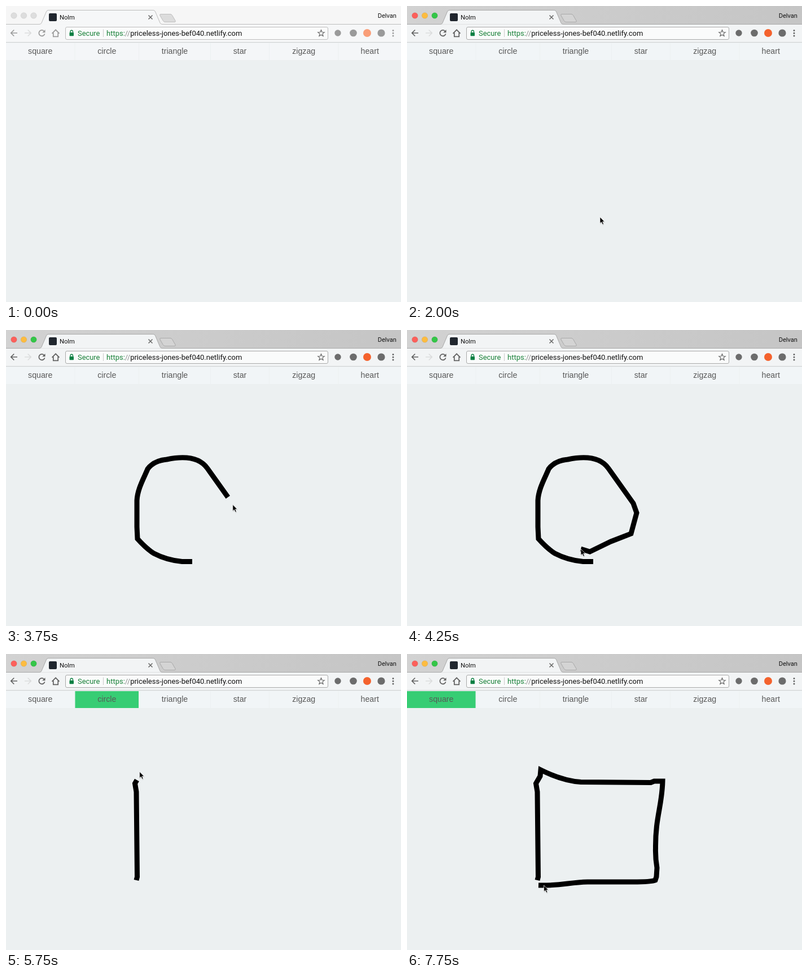
An HTML page for the animation above (8 s loop, 700x526 px).

```html
<!DOCTYPE html>
<html lang="en">
<head>
<meta charset="utf-8">
<title>Shape sketch</title>
<style>
  html, body { margin: 0; width: 100%; height: 100%; overflow: hidden; background: #ecf0f1; }
  svg { display: block; width: 700px; height: 526px; }
  text { font-family: Roboto, "Open Sans", sans-serif; fill: #111; }
  #nav text { font: 14.2px "Liberation Sans", Arial, sans-serif; fill: #585858; text-anchor: middle; }
  .icon { fill: none; stroke: var(--icon); stroke-width: 1.7; }
  .ext { fill: var(--ext); }
  .edge { stroke: var(--edge); }
  .secure { fill: #188038; }
  #ink { fill: none; stroke: #000; stroke-width: 9; }
  #stage { --bar: #f6f6f6; --tool: #f6f7f8; --cell: #f4f6f8; --edge: #bdbdbd; --icon: #9b9b9b; --ext: #9a9a9a;
    --hot: #f99e78; --plus: #dcdcdc; }
  #stage.active { --bar: url(#metal); --tool: #f2f4f5; --cell: #f1f5f7; --edge: #a9a9a9; --icon: #606060; --ext: #6c6c6c;
    --hot: #f4622d; --plus: #d4d4d4; }
  #lights circle { stroke: #0001; }
  #stage:not(.active) #lights circle { fill: #ddd; }
</style>
</head>
<body>
<svg id="stage" viewBox="0 0 700 526">
  <defs>
    <linearGradient id="metal">
      <stop offset="0" stop-color="#d2d2d2"/>
      <stop offset="1" stop-color="#c5c5c5"/>
    </linearGradient>
  </defs>

  <rect width="700" height="33" style="fill:var(--bar)"/>
  <rect y="33" width="700" height="32" style="fill:var(--tool)"/>
  <g id="lights">
    <circle cx="14" cy="17" r="5.3" fill="#fc605b"/>
    <circle cx="31.5" cy="17" r="5.3" fill="#fdbc40"/>
    <circle cx="49" cy="17" r="5.3" fill="#34c648"/>
  </g>
  <path class="edge" d="M0 32.5H59Q62 32.5 63 30L71.5 10Q72.5 7.5 75 7.5H261Q263.5 7.5 264.5 10L273 30Q274 32.5 277 32.5H700" style="fill:var(--tool)"/>
  <path class="edge" d="M274 14.5H291Q293.5 14.5 294.5 16.5L300 26Q301 28.5 299 28.5H282Q279.5 28.5 278.5 26.5L273 17Q272 14.5 274 14.5Z" style="fill:var(--plus)"/>
  <rect x="76" y="13" width="14" height="14" rx="2" fill="#20262e"/>
  <text x="95" y="24" font-size="11.2">Nolm</text>
  <path d="M252.5 16.5l7 7m0-7l-7 7" stroke="#666" stroke-width="1.5"/>
  <text x="692" y="21" font-size="11.1" text-anchor="end">Delvan</text>

  <g class="icon">
    <path d="M20 48H9m5.300-5.500L8.800 48l5.500 5.500"/>
    <path d="M33 48H44m-5.300-5.500l5.500 5.500l-5.500 5.500" style="stroke:#dcdddd"/>
    <path d="M67.300 44.500A5.200 5.200 0 1 0 68.600 49.500"/>
    <path d="M69.500 42V47.300H64.200Z" style="fill:var(--icon);stroke:none"/>
    <path d="M81.500 48.800L88 42.300L94.500 48.800M83.800 47.500V54.300H92.200V47.500"/>
  </g>
  <rect class="edge" x="105.500" y="37.500" width="465" height="22" rx="2.500" fill="#fafbfb"/>
  <rect x="112.500" y="47" width="7.500" height="6.200" rx=".8" fill="#0b8043"/>
  <path d="M114 47.500V45.500a2.250 2.250 0 0 1 4.500 0v2" fill="none" stroke="#0b8043" stroke-width="1.300"/>
  <text class="secure" x="127" y="52.500" font-size="12.9">Secure</text>
  <path d="M172.500 41.500V55" stroke="#c9c9c9"/>
  <text x="178" y="52.500" font-size="13"><tspan class="secure">https:</tspan><tspan fill="#8a8a8a">//</tspan>priceless-jones-bef040.netlify.com</text>
  <path id="star" fill="none" stroke="#666" stroke-width="1.200"/>
  <g class="ext">
    <circle cx="588" cy="48" r="5.700"/>
    <circle cx="615.500" cy="48" r="6.300"/>
    <circle cx="640" cy="48" r="7" style="fill:var(--hot)"/>
    <circle cx="665" cy="48" r="6.600"/>
  </g>
  <path d="M686 43.500v10" fill="none" stroke-width="3" stroke-linecap="round" stroke-dasharray="0 4.800" style="stroke:var(--icon)"/>
  <path d="M0 64.500H700" stroke="#cfd1d2"/>
  <g id="nav"></g>

  <path id="ink"/>
  <g id="cursor">
    <path d="M.5 2V13L3.200 10.500L5 14.800L7.200 13.800L5.300 9.700H9Z" opacity=".15"/>
    <path d="M0 0V11.300L2.600 8.900L4.500 13.200L6.500 12.300L4.600 8.200H8Z" stroke="#fff" stroke-width=".7"/>
  </g>
</svg>
<script>
const LOOP = 8000, STEP = 250, FOCUS = 1750;
const PEN_SPEED = 0.417; // px per ms
const PEN_LEAD = 16;     // the pointer runs ahead of the drawn line

const strokes = [
  { label: 'circle', start: 2750, matched: 4500,
    d: 'M330 411.5H312Q285 409 262 397Q248 388 233 371L232 350V303C233 282 245 262 251 247Q262 232 285 230' +
       'Q338 219 357 246L401 308L407 325L397 362L361 376L324 394L308 389' },
  { label: 'square', start: 5320, matched: 7500,
    d: 'M231 402L232.500 396L231 245L228.500 230L236 217L237 206Q275 225 308 227.500L432 228.500L438 226H453' +
       'C452 270 440 290 440.500 345Q440 362 443 380L442 396L440 402Q434 405 400 405H320C285 406 275 412 233 411' }
];
const glides = [
  { from: 500, to: 750, a: [330, 369], b: [320.5, 338] },
  { from: 1250, to: 2750, a: [320.5, 338], b: [363.5, 412] },
  { from: 4250, to: 5000, a: [308, 389], b: [226.5, 402] },
  { from: 7250, to: 7750, a: [233, 411], b: [242.5, 411] }
];

const $ = id => document.getElementById(id);
const stage = $('stage'), ink = $('ink'), cursor = $('cursor');

const labels = ['square', 'circle', 'triangle', 'star', 'zigzag', 'heart'];
const edges = [0, 122.5, 236, 363, 467, 589.5, 701];
$('nav').innerHTML = labels.map((label, i) => {
  const x = edges[i], width = edges[i + 1] - x - 1;
  return `<rect x="${x}" y="66" width="${width}" height="30"/><text x="${x + width / 2}" y="85">${label}</text>`;
}).join('');
const cells = $('nav').querySelectorAll('rect');

$('star').setAttribute('d', 'M' + Array.from({ length: 10 }, (_, i) => {
  const r = i % 2 ? 2.6 : 6, angle = i * Math.PI / 5;
  return [558.5 + r * Math.sin(angle), 48.6 - r * Math.cos(angle)];
}).join('L') + 'Z');

function glideAt(t) {
  const { from, to, a, b } = glides.filter(g => t >= g.from).pop();
  const k = Math.min(1, (t - from) / (to - from));
  return a.map((v, i) => v + (b[i] - v) * k);
}

function render(time) {
  const t = Math.floor(time % LOOP / STEP) * STEP;
  const match = strokes.filter(s => t >= s.matched).pop();
  const stroke = strokes.filter(s => t > s.start).pop();

  stage.classList.toggle('active', t >= FOCUS);
  cells.forEach((cell, i) => cell.style.fill = labels[i] === match?.label ? '#37cd74' : 'var(--cell)');

  ink.setAttribute('d', stroke ? stroke.d : '');
  let pen = null;
  if (stroke) {
    const drawn = (t - stroke.start) * PEN_SPEED, total = ink.getTotalLength();
    ink.setAttribute('stroke-dasharray', `${Math.min(drawn, total)} ${total}`);
    if (drawn < total) pen = ink.getPointAtLength(drawn + PEN_LEAD);
  }

  cursor.style.display = t < 500 ? 'none' : '';
  if (t >= 500) {
    const [x, y] = pen ? [pen.x, pen.y] : glideAt(t);
    cursor.setAttribute('transform', `translate(${x} ${y})`);
  }
}

const begin = performance.now();
function tick() {
  render(performance.now() - begin);
  requestAnimationFrame(tick);
}
tick();
</script>
</body>
</html>
```
